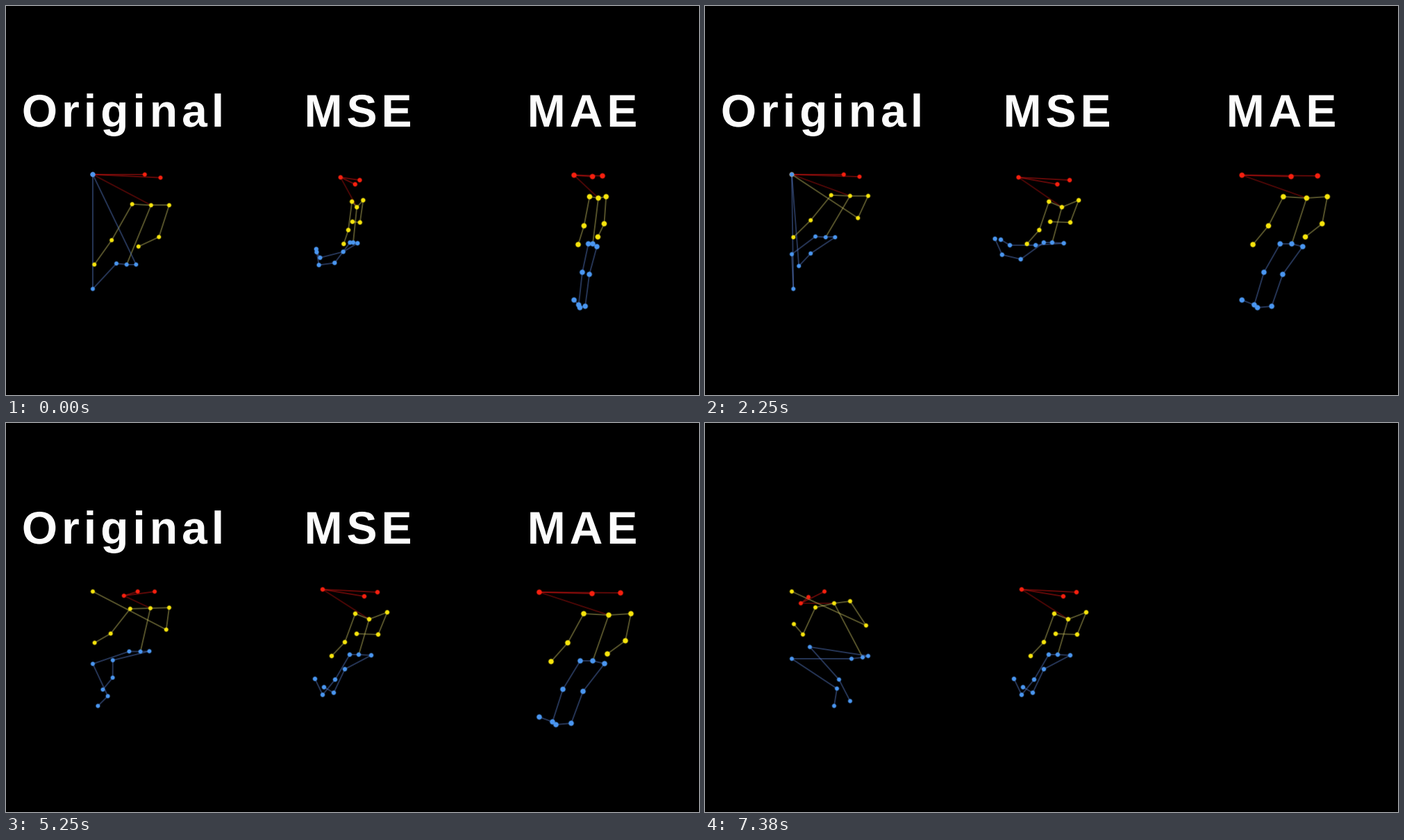
Recreate the animation shown at these times as a matplotlib script. Size 998 by 561 pixels, loop 7.51 s.

```python
import matplotlib.pyplot as plt
import numpy as np
from matplotlib.animation import FuncAnimation
from matplotlib.collections import LineCollection
from matplotlib.patches import PathPatch
from matplotlib.path import Path
from matplotlib.textpath import TextPath

W, H, DPI = 998, 561, 64
LOOP_MS, STEPS = 7510, 60
FRAMES = 2 * STEPS  # two drawn frames per pose step
PT = 72 / DPI  # points per pixel
FONT = dict(family="Liberation Sans", weight="bold")
TITLE_SIZE, TRACKING, BASELINE = 66, 6, 174

# Joints: head 0-2, neck 3, arms 4-6 and 7-9, pelvis 10, legs 11-14 and 15-18.
PELVIS, LEFT_HIP, RIGHT_HIP = 10, 11, 15
PARENTS = [0, 0, 0, 3, 4, 5, 3, 7, 8, 3, 10, 11, 12, 13, 10, 15, 16, 17]
DOT_COLORS = ["#f6200f"] * 3 + ["#f6e40c"] * 7 + ["#4a96f0"] * 9
BONE_COLORS = ([(0.88, 0.08, 0.07, 0.42)] * 2 + [(0.88, 0.08, 0.07, 0.32)]
               + [(0.85, 0.82, 0.42, 0.38)] * 7
               + [(0.36, 0.5, 0.82, 0.4)] * 8)


def pose(*coords):
    """Joint positions as complex numbers x + iy."""
    x, y = np.array(coords, float).reshape(-1, 2).T
    return x + 1j * y


STRIDE = pose(185, 248, 204, 243, 224, 246, 212, 272,
              188, 271, 162, 305, 140, 328, 235, 272, 222, 302, 196, 311,
              181, 328, 168, 327, 138, 351, 140, 398, 125, 408,
              193, 328, 162, 350, 147, 367, 125, 379)
FINISH = pose(138, 260, 149, 251, 172, 243, 186, 260,
              159, 266, 141, 305, 128, 290, 209, 257, 232, 292, 125, 243,
              227, 338, 211, 340, 125, 340, 190, 383, 186, 408,
              235, 336, 151, 323, 193, 370, 209, 401)
MSE_REST = pose(456, 240, 516, 250, 535, 244, 523, 283,
                503, 275, 488, 316, 469, 336, 549, 273, 536, 305, 505, 304,
                508, 334, 495, 334, 474, 370, 456, 392, 445, 369,
                526, 335, 488, 355, 472, 389, 458, 381)
MAE_REST = pose(768, 244, 844, 246, 885, 245, 868, 277,
                832, 275, 809, 317, 785, 344, 900, 275, 892, 314, 866, 333,
                845, 343, 827, 343, 802, 384, 787, 431, 768, 424,
                862, 347, 831, 387, 814, 433, 792, 435)

# The tracked body is fitted to this box; joints lost by the tracker
# (joint, first step, end step) drop into its upper left corner.
BOX_X, BOX_Y = (125, 235), (243, 408)
LOST = [(0, 0, 42), (9, 4, 23), (9, 42, STEPS), (13, 0, 12), (14, 0, 23),
        (16, 0, 4), (17, 0, 12), (18, 0, 23)]


def fold(joints, hip, thigh, shin):
    """Turn the thigh and shin below a hip; the foot keeps its direction."""
    turns = np.exp(1j * np.array([thigh, shin, 0]))
    bones = np.diff(joints[hip:hip + 4]) * turns
    joints[hip + 1:hip + 4] = joints[hip] + np.cumsum(bones)


def fit(values, known, bounds):
    low, high = values[known].min(), values[known].max()
    return np.interp(values, (low, high), bounds)


def tracked_pose(step):
    u = np.clip((step - 36) / 23, 0, 1)
    joints = STRIDE + (FINISH - STRIDE) * u
    swing = 0.2 * np.sin(2 * np.pi * step / 12) * (1 - u)
    fold(joints, LEFT_HIP, swing, swing)
    fold(joints, RIGHT_HIP, -swing, -swing)
    lost = [joint for joint, start, end in LOST if start <= step < end]
    known = np.setdiff1d(np.arange(len(joints)), lost)
    joints = (fit(joints.real, known, BOX_X)
              + 1j * fit(joints.imag, known, BOX_Y))
    joints[lost] = BOX_X[0] + 1j * BOX_Y[0]
    return joints


def widen(rest, step):
    """Open a body sideways from a thin column around its pelvis."""
    width = 1 - 0.65 * np.exp(-(step / 12) ** 2)
    offset = rest - rest[PELVIS]
    return rest[PELVIS] + offset.real * width + 1j * offset.imag


def mse_pose(step):
    curl = np.exp(-((step - 9) / 10) ** 2)
    joints = widen(MSE_REST, step) + curl * (-18 + 16j)
    for hip in (LEFT_HIP, RIGHT_HIP):
        fold(joints, hip, 1.0 * curl, 2.6 * curl)
    return joints


def mae_pose(step):
    return widen(MAE_REST, step)


class Skeleton:
    def __init__(self, ax, pose_at, dot):
        self.pose_at = pose_at
        self.bones = LineCollection([], colors=BONE_COLORS, linewidths=2 * PT)
        ax.add_collection(self.bones)
        start = pose_at(0)
        self.dots = [
            ax.scatter(start.real, start.imag, s=(size * PT) ** 2,
                       c=DOT_COLORS, alpha=alpha, linewidths=0, zorder=3)
            for size, alpha in ((dot + 1.8, 0.35), (dot, 1))
        ]

    def show(self, step, visible=True):
        joints = self.pose_at(step)
        points = np.column_stack([joints.real, joints.imag])
        self.bones.set_segments(np.stack([points[PARENTS], points[1:]], axis=1))
        for artist in (self.bones, *self.dots):
            artist.set_visible(visible)
        for dots in self.dots:
            dots.set_offsets(points)


def glyphs(text):
    return TextPath((0, 0), text, size=TITLE_SIZE, prop=FONT)


def advance(text):
    return glyphs(text + "l").get_extents().x1 - glyphs("l").get_extents().x1


def add_title(ax, text, center):
    letters = []
    for i, char in enumerate(text):
        path = glyphs(char)
        x = (advance(text[:i]) if i else 0) + i * TRACKING
        letters.append(Path(path.vertices + [x, 0], path.codes))
    word = Path.make_compound_path(*letters)
    box = word.get_extents()
    shift = [center - (box.x0 + box.x1) / 2, BASELINE]
    outline = Path(word.vertices * [1, -1] + shift, word.codes)
    return ax.add_patch(PathPatch(outline, fc="#fcfcfc", lw=0))


fig = plt.figure(figsize=(W / DPI, H / DPI), dpi=DPI, facecolor="black")
ax = fig.add_axes([0, 0, 1, 1])
ax.axis("off")

titles = [add_title(ax, *title) for title in
          (("Original", 167.5), ("MSE", 508), ("MAE", 831))]
tracked = Skeleton(ax, tracked_pose, 5.4)
mse = Skeleton(ax, mse_pose, 5.8)
mae = Skeleton(ax, mae_pose, 7)
ax.set(xlim=(0, W), ylim=(H, 0))


def draw(frame):
    step = min((frame + 1) // 2, STEPS - 1)
    # The titles and the right-hand skeleton cut out on the last step.
    full = step < STEPS - 1
    for title in titles:
        title.set_visible(full)
    tracked.show(step)
    mse.show(step)
    mae.show(step, full)


anim = FuncAnimation(fig, draw, frames=FRAMES, init_func=lambda: draw(0),
                     interval=LOOP_MS / FRAMES, repeat=True, repeat_delay=0)
plt.show()
```
